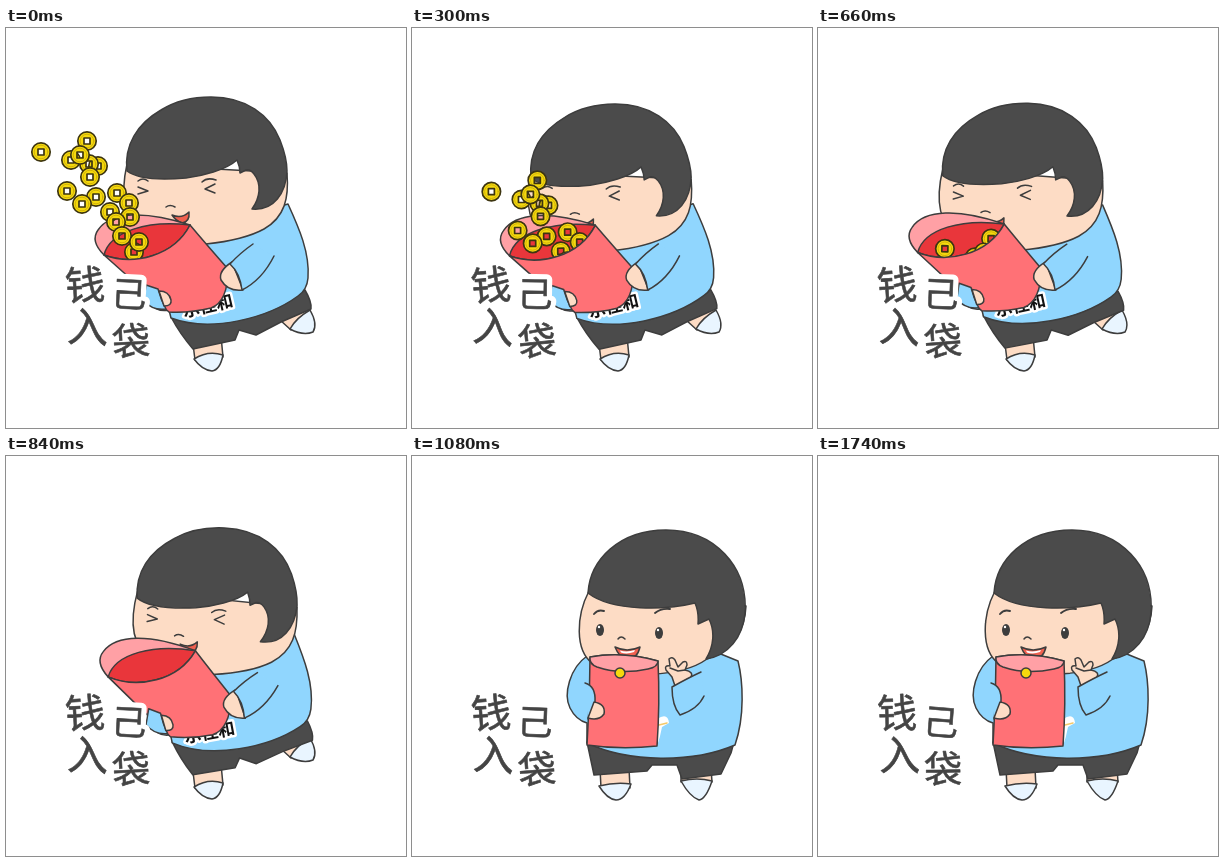
Recreate the animation shown at these times as an HTML page. Size 400x400 px, loop 1.8 s.

```html
<!DOCTYPE html>
<html lang="zh">
<head>
<meta charset="utf-8">
<style>
html, body { margin: 0; width: 100%; height: 100%; overflow: hidden; background: #fff; }
svg { display: block; width: 100%; height: 100%; }
.art { stroke: #3d3d3d; stroke-width: 1.5; stroke-linejoin: round; stroke-linecap: round; }
.skin { fill: #fddcc5; }
.hair { fill: #4b4b4b; }
.blue { fill: #90d6fe; }
.shoe { fill: #e9f5ff; }
.red { fill: #ff7176; }
.pink { fill: #ffa0a5; }
.deep { fill: #e9363b; }
.lips { fill: #f0604f; }
.line { fill: none; }
.bold { stroke-width: 1.9; }
.gold { fill: #f5d90d; }
text { font-family: "Noto Sans CJK SC", "Noto Sans CJK", sans-serif; text-anchor: middle; stroke-linejoin: round; }
.shirt { font-size: 17px; font-weight: 700; fill: #111; stroke: #fff; stroke-width: 5; paint-order: stroke; }
.halo { fill: #fff; stroke: #fff; stroke-width: 11; }
.ink { fill: #444; stroke: #444; stroke-width: .6; }
</style>
</head>
<body>
<svg viewBox="0 0 400 400">
  <defs>
    <g id="coin" stroke="#3d3510" stroke-width="1.7">
      <path class="gold" fill-rule="evenodd" d="M-9.2 0A9.2 9.2 0 1 1 9.2 0A9.2 9.2 0 1 1 -9.2 0ZM-3 -3V3H3V-3Z"/>
      <circle r="6.8" fill="none" stroke="#c9a90a" stroke-width=".8"/>
    </g>
    <clipPath id="mouthOfBag"><path d="M0 0H230V190L184 197C168 228 128 238 98 227L0 224Z"/></clipPath>
  </defs>

  <g id="hug" class="art">
    <path class="skin" d="M187 316L189 332Q206 330 217 329L215 308ZM274 292L285 302L304 284L300 276Z"/>
    <path class="shoe" d="M188 331Q202 322 217 327Q214 342 206 343Q196 342 188 331ZM284 301Q290 290 304 282Q312 296 307 304Q297 308 284 301Z"/>
    <g id="lean">
      <path class="hair" d="M165 289C195 301 260 290 299 262Q306 274 305 281L275 294L250 307L233 302L229 312L187 321Q174 306 165 289Z"/>
      <path class="blue" d="M200 200L282 176C293 200 304 225 302 250Q301 262 292 268C262 290 205 305 165 290L163 282Q150 285 141 272L141 250Z"/>
      <text class="shirt" x="202" y="284" transform="rotate(-13 202 279)">示佳和</text>
      <g id="head">
        <path class="skin" d="M121 136C115 163 115 190 138 203C160 216 180 218 200 216Q238 212 258 201C279 189 283 170 281 145Z"/>
        <path class="hair" d="M121 143C118 117 131 96 155 82C171 72 188 69 205 69C240 69 264 87 274 112Q281 130 281 143C280 165 268 183 246 181C254 170 256 156 248 146Q244 141 240 142L234 145Q234 139 231 132C220 142 196 148 180 150C158 152 133 152 121 143Z"/>
        <path class="line" d="M132 159L142 163L132 166M209 156L199 161L209 165M132 153Q137 149 142 153M196 154Q201 149 210 152M160 179Q164 176 169 179"/>
        <path class="lips" d="M166 187Q176 191 183 184Q184 194 176 195Q170 193 166 187Z"/>
      </g>
      <path class="pink" d="M98 227Q84 213 92 202C104 184 138 182 184 197Z"/>
      <path class="deep" d="M98 227C104 203 142 192 184 197C168 228 128 238 98 227Z"/>
      <g clip-path="url(#mouthOfBag)" id="coins"></g>
      <path class="red" d="M98 227C128 238 168 228 184 197Q200 216 222 241C222 262 216 276 205 280Q185 285 163 284Q131 257 98 227Z"/>
      <path class="blue" d="M140 257L152 261Q155 272 160 281Q147 283 138 273Z"/>
      <path class="skin" d="M153 263Q163 263 165 272Q166 278 158 278Z"/>
      <path class="skin" d="M226 234Q212 243 215 252Q222 264 237 262Z"/>
      <path class="blue" d="M247 216Q234 225 224 236Q234 245 236 262Q256 252 268 228"/>
    </g>
  </g>

  <g id="cheer" class="art">
    <path class="skin" d="M188 312L189 332H218L217 312ZM269 312V326H300L299 312Z"/>
    <path class="shoe" d="M187 330Q203 326 219 328Q213 344 204 344Q195 343 187 330ZM269 325Q285 321 300 325Q294 343 287 344Q278 341 269 325Z"/>
    <path class="hair" d="M175 286H322L319 297L309 318L270 323L265 309H240L235 315L182 319Z"/>
    <path class="blue" d="M175 200C158 212 151 238 158 252Q164 264 175 267L175 287C217 307 281 307 323 289C333 260 331 225 326 205L294 192Z"/>
    <path d="M245 263Q256 256 257 267L250 271Q248 282 245 290Z" fill="#fff" stroke="none"/>
    <path d="M247 269L255 267" stroke="#f4c96a"/>
    <path d="M245 278V288"/>
    <path class="skin" d="M177 135C164 160 163 194 180 207C210 224 270 221 295 203C320 195 333 175 334 150Z"/>
    <path class="hair" d="M176 137C178 104 207 74 254 74C302 74 336 110 333 157C331 181 316 200 294 203C302 190 303 175 297 163L286 168Q287 156 283 147C255 154 200 156 176 137Z"/>
    <g id="brows" class="line bold"><path d="M182 158Q186 153 192 155M243 157Q249 152 258 153"/></g>
    <g id="open" fill="#3d3d3d" stroke="none">
      <ellipse cx="188" cy="174" rx="4" ry="6"/><ellipse cx="247" cy="177" rx="4" ry="6"/>
      <circle cx="187" cy="171" r="1.2" fill="#fff"/><circle cx="246" cy="174" r="1.2" fill="#fff"/>
    </g>
    <path id="shut" class="line bold" d="M183 174Q188 178 193 174M242 177Q247 181 252 177"/>
    <path class="line" d="M206 183Q209 179 213 183"/>
    <path class="lips" d="M203 191Q215 197 228 191Q225 204 214 203Q207 201 203 191Z"/>
    <path d="M208 194.5Q215 196.500 223 194L222 196Q215 198.500 209 196.500Z" fill="#fff" stroke="none"/>
    <path class="red" d="M178 201Q210 195 246 205Q248 248 245 290Q209 294 175 289Q178 245 178 201Z"/>
    <path class="pink" d="M178 201Q211 195 246 205Q246 211 236 213Q208 219 185 211Q177 208 178 201Z"/>
    <circle class="gold" cx="208" cy="217" r="5"/>
    <path class="blue" d="M173 227Q184 230 183 246L176 263"/>
    <path class="skin" d="M182 246Q194 248 192 258Q187 265 176 262Z"/>
    <g id="wave">
      <path class="skin" d="M260 221L254 214Q252 209 258 210L257 203Q260 200 263 204L266 211L271 206Q275 204 275 209L273 214Q282 216 279 221L274 226L263 230Z"/>
      <path class="line" d="M258 212L266 215L273 214"/>
      <path class="blue" d="M289 216Q276 222 260 231Q260 250 268 259Q286 253 292 240"/>
    </g>
  </g>
  <g id="words"></g>
</svg>
<script>
const $ = id => document.getElementById(id);
const LOOP = 1800, STEP = 60, SWITCH = 960;
const set = (id, value) => $(id).setAttribute('transform', value);
const show = (id, on) => { $(id).style.display = on ? '' : 'none'; };

const coins = [[35,124],[81,113],[92,138],[83,136],[65,132],[74,127],[84,149],[61,163],
  [111,165],[90,169],[76,176],[104,184],[123,175],[124,189],[110,194],[116,208],[128,224],[133,214]];
$('coins').innerHTML = '<g id="fall">' +
  coins.map(([x, y]) => `<use href="#coin" x="${x}" y="${y}"/>`).join('') + '</g>';

// character, centre x, centre y, size, tilt, sway
const words = [['钱',79,257,40,-3,2], ['入',82,299,41,3,-3], ['己',123,266,35,3,2], ['袋',125,313,38,-3,3]];
$('words').innerHTML = ['halo', 'ink'].map(kind => words.map(([c, x, y, size]) =>
  `<text class="${kind}" x="${x}" y="${y + size * .37}" font-size="${size}">${c}</text>`).join('')).join('');
const glyphs = [...$('words').children];

function draw(now) {
  const t = Math.floor(now % LOOP / STEP) * STEP;
  const hugging = t < SWITCH;
  show('hug', hugging);
  show('cheer', !hugging);

  if (hugging) {
    const bob = .5 - .5 * Math.cos(t / 480 * 2 * Math.PI);
    const k = Math.min(1, Math.max(0, (t - 480) / 360));
    const lean = k * k * (3 - 2 * k);
    set('lean', `rotate(${2.8 * lean - .4 * bob} 235 315)`);
    set('head', `translate(${3 * lean - bob} ${8 * bob})`);
    set('fall', `translate(${.163 * t - 4e-5 * t * t} ${.112 * t + 5.7e-5 * t * t})`);
    show('fall', t < 780);
  } else {
    const blink = t === 1200 || t === 1260 || t === 1620 || t === 1680;
    show('open', !blink);
    show('shut', blink);
    set('brows', `translate(0 ${blink ? 2 : 0})`);
    const swing = t > 1080 && t < 1680 ? Math.sin((t - 1080) / 300 * 2 * Math.PI) : 0;
    set('wave', `rotate(${4 * swing} 280 245)`);
  }

  const sway = Math.sin(t / 420 * 2 * Math.PI);
  glyphs.forEach((glyph, i) => {
    const [, x, y, , tilt, amount] = words[i % words.length];
    glyph.setAttribute('transform', `rotate(${tilt + amount * sway} ${x} ${y})`);
  });
}

const start = performance.now();
function tick() {
  draw(performance.now() - start);
  requestAnimationFrame(tick);
}
tick();
</script>
</body>
</html>
```
